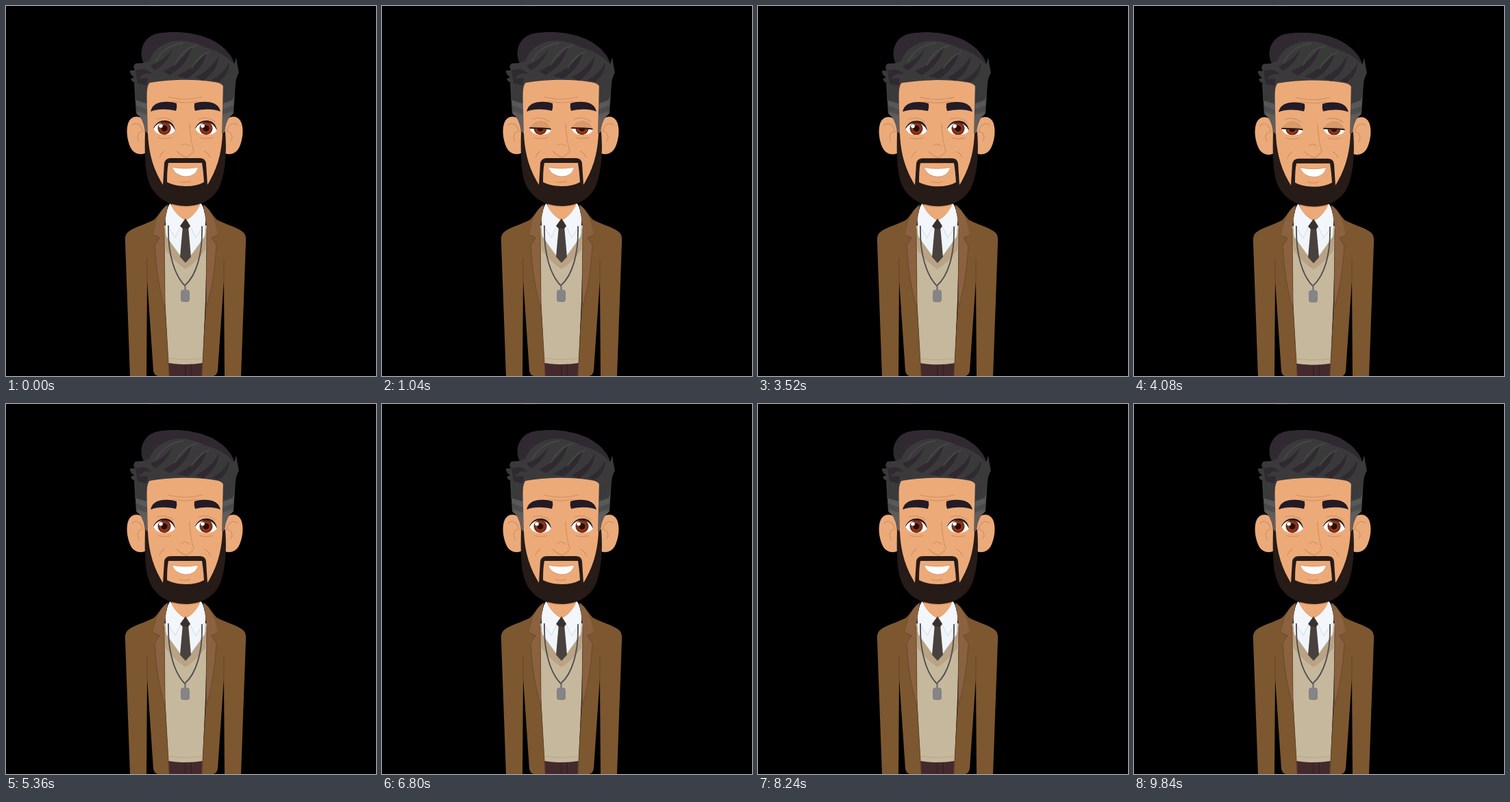
An HTML page that plays this animation: 540 by 540 pixels, repeating every 9.92 s.

```html
<!DOCTYPE html>
<html lang="en">
<head>
<meta charset="utf-8">
<title>Blinking portrait</title>
<style>
  html, body { margin: 0; width: 100%; height: 100%; overflow: hidden; background: #000; }
  svg { display: block; width: 100%; height: 100%; }
  .line { fill: none; stroke-linecap: round; stroke-linejoin: round; }
  .crease { stroke: #cf8f5f; stroke-width: 1.1; }
  .seam { stroke: #66472a; stroke-width: .9; }
</style>
</head>
<body>
<svg viewBox="0 0 540 540">
  <defs>
    <clipPath id="eyeShape"><path d="M-16 -1C-12 -9 -6 -12 1 -12C9 -12 14 -7 16 2C13 7 8 9 0 9C-8 9 -13 6 -16 -1Z"/></clipPath>
    <linearGradient id="fade" x1="0" y1="0" x2="0" y2="1">
      <stop offset="0" stop-color="#3b3a3b"/>
      <stop offset=".55" stop-color="#4d4c4c"/>
      <stop offset="1" stop-color="#6f6058"/>
    </linearGradient>

    <g id="jacket">
      <path fill="#7d5730" d="M236 290C227 295 223 306 216 312C203 319 186 323 178 330Q173 334 174 345L181 540H205L206 400L215 532Q216 539 222 540H238L232 435L231 322Z"/>
      <path fill="#8a6240" d="M236 290C227 296 222 308 219 316L215 334L224 338L217 349C219 385 224 415 232 442L231 322Z"/>
      <path class="line seam" d="M215 334L224 338L217 349C219 385 224 415 232 442M231 325L232 435L238 538M206 368V402"/>
    </g>
    <g id="collar">
      <path fill="#f3f7fc" d="M240 288Q234 292 233 318L247 339L260 313Q245 302 240 288Z"/>
      <path class="line" stroke="#cfd9e3" d="M235 320L247 338L259 314"/>
    </g>
    <g id="ear">
      <path fill="#ebaa7a" d="M207 174C200 161 188 158 181 166C174 175 176 195 182 207C188 218 199 218 207 213Z"/>
      <path class="line crease" d="M184 174C190 168 198 173 200 183M200 183C193 183 190 190 194 197"/>
    </g>
    <g id="sideburn">
      <path fill="url(#fade)" d="M187 112H205L207 186H203Q202 170 195 161L190 157Z"/>
      <path fill="#686767" opacity=".5" d="M189 133L206 140V151L190 145ZM192 154L206 159V184Q203 166 192 159Z"/>
    </g>
    <path id="brow" fill="#231c26" d="M211 154C213 146 218 141 230 140Q240 139 249 142Q250 148 248 153C234 150 222 150 211 154Z"/>
    <g id="eye">
      <g clip-path="url(#eyeShape)">
        <rect x="-17" y="-13" width="34" height="24" fill="#fff"/>
        <circle cy="-.5" r="9.6" fill="#7b2d16"/>
        <circle cy="-.5" r="7" fill="#8c3a1c"/>
        <circle cy="-.5" r="4.6" fill="#2a0e0a"/>
        <circle cx="-5" cy="-4" r="2.8" fill="#fff"/>
        <path id="lid" fill="#d99a6b"/>
        <path id="lash" class="line" stroke="#2a1c1b"/>
      </g>
      <path class="line crease" d="M-11 -14Q1 -19 13 -10M-9 13Q0 16 10 13"/>
    </g>
  </defs>

  <rect width="540" height="540"/>
  <ellipse cx="215" cy="0" rx="11" ry="1.5" fill="#14060b"/>

  <g id="body">
    <path fill="#452a2d" d="M236 518H288L290 545H234Z"/>
    <path class="line" stroke="#2e1c1f" d="M262 524V540M270 524V540"/>
    <path fill="#c5b89d" d="M230 320H294L291 430L287 521Q262 525 237 521L232 430Z"/>
    <path class="line" stroke="#b6a686" d="M237 514Q262 518 287 514"/>
    <path fill="#b9a384" d="M231 333L233 356Q246 374 262 384Q278 374 291 356L293 333Z"/>
    <path fill="#f0f5fa" d="M232 302H292L290 336L262 375L234 336Z"/>
    <path fill="#dc9766" d="M244 278H281L285 293Q277 305 262 313Q246 304 241 292Z"/>
    <path fill="#ecaa79" d="M242 291Q262 296 283 291Q277 304 262 312Q247 304 242 291Z"/>
    <use href="#collar"/><use href="#collar" transform="matrix(-1 0 0 1 524 0)"/>
    <path fill="#48413e" d="M258 321H266L270 366L262 375L254 366Z"/>
    <path fill="#38312f" d="M262 310L269 321L266 325H258L254 321Z"/>
    <use href="#jacket"/><use href="#jacket" transform="matrix(-1 0 0 1 524 0)"/>
    <path class="line" stroke="#4d4b4e" stroke-width="1.8" d="M237 321C236 362 246 393 261 408C278 393 287 362 286 322"/>
    <path class="line" stroke="#666568" stroke-width="2" d="M261.500 407V416"/>
    <rect x="255" y="414" width="13" height="18" rx="4" fill="#858486"/>
  </g>

  <g id="head">
    <use href="#ear"/><use href="#ear" transform="matrix(-1 0 0 1 522 0)"/>
    <path fill="#edaa79" d="M204 105H319L320 212Q314 270 262 282Q210 270 204 212Z"/>
    <use href="#sideburn"/><use href="#sideburn" transform="matrix(-1 0 0 1 522 0)"/>

    <path fill="#261b17" d="M203 183L207 186C208 208 212 234 229 261L231 230Q232 222 241 222H283Q291 222 292 230L294 261C311 234 315 208 316 186L320 183Q324 236 311 265C300 286 279 292 262 292C243 292 222 284 211 263C203 247 202 220 203 183Z"/>
    <path fill="#edaa79" d="M237 229H286Q288 241 289 257Q279 263 262 263Q246 263 235 257Q235 238 237 229Z"/>
    <path fill="#fff" stroke="#c58158" stroke-width=".7" d="M242 235Q262 239 281 235Q277 249 262 249Q247 248 242 235Z"/>
    <path class="line crease" d="M253 256Q261 259 269 256"/>
    <path class="line crease" d="M268 172Q269 196 274 211Q272 216 263 221Q255 218 249 212M256 203Q262 199 267 204M237 133Q262 139 286 133M244 139Q262 143 280 139M231 212Q226 215 224 221M290 212Q296 215 298 221"/>
    <use href="#brow"/><use href="#brow" transform="matrix(-1 0 0 1 524 0)"/>
    <use href="#eye" transform="translate(231 179)"/>
    <use href="#eye" transform="translate(292 179)"/>

    <path fill="#3b3a3b" d="M188 137L190 112Q184 112 182 106L187 104Q180 99 181 94L188 94Q184 88 189 84L201 83C193 67 200 47 218 41C244 35 279 39 301 50C320 60 331 74 333 85L336 75Q338 88 340 97Q335 105 334 120L331 137L317 142V117Q314 112 304 111Q260 104 210 112Q205 114 205 142Z"/>
    <g fill="#302931">
      <path d="M201 83C193 67 200 47 218 41C244 35 279 39 301 50C320 60 331 74 333 85Q315 66 292 61Q269 48 247 51Q218 56 209 80Z"/>
      <path d="M211 87Q230 80 243 63Q235 84 217 94Z"/>
      <path d="M229 95Q252 86 272 58Q266 85 239 101Z"/>
      <path d="M249 102Q279 88 294 64Q289 91 264 106Z"/>
      <path d="M276 104Q298 94 311 72Q309 95 287 109Z"/>
      <path d="M300 108Q318 99 326 82Q326 100 310 111Z"/>
      <path d="M189 94Q204 89 213 99Q199 96 194 107Q199 104 207 106L205 116L192 113Z"/>
    </g>
    <path class="line" stroke="#484648" stroke-width="2" d="M219 81Q230 58 258 54M247 85Q258 62 278 58M271 90Q282 72 296 67"/>
  </g>
</svg>

<script>
  const LOOP = 9920, STEP = 80;
  const BLINK_EVERY = 3040, BLINK_PEAK = 1040, BLINK_HALF = 160;
  const bob = [[0, 0], [2960, 0], [4080, .7], [4720, .3], [5280, .3], [5360, 0], [LOOP, 0]];

  function track(points, t) {
    const i = Math.max(1, points.findIndex(p => p[0] >= t));
    const [t0, a] = points[i - 1], [t1, b] = points[i];
    return a + (b - a) * (t - t0) / (t1 - t0);
  }

  const byId = id => document.getElementById(id);
  const head = byId("head"), body = byId("body"), lid = byId("lid"), lash = byId("lash");
  const shift = (el, y) => el.setAttribute("transform", `translate(0 ${y.toFixed(2)})`);

  // The lid's corners stay put while its arc flattens.
  function setLid(closed) {
    const y = -14.5 + 13.5 * closed;
    const edge = `M-17 -1C-9 ${y} 9 ${y} 17 1`;
    lid.setAttribute("d", edge + "V-40H-17Z");
    lash.setAttribute("d", edge);
    lash.setAttribute("stroke-width", 3.4 - 1.4 * closed);
  }

  function draw(now) {
    const t = Math.floor(now % LOOP / STEP) * STEP;
    const y = track(bob, t);
    const fromPeak = Math.abs(t % BLINK_EVERY - BLINK_PEAK);
    shift(head, y);
    shift(body, y);
    setLid(Math.max(0, 1 - fromPeak / BLINK_HALF));
  }

  const origin = performance.now();
  function frame() {
    draw(performance.now() - origin);
    requestAnimationFrame(frame);
  }
  frame();
</script>
</body>
</html>
```
